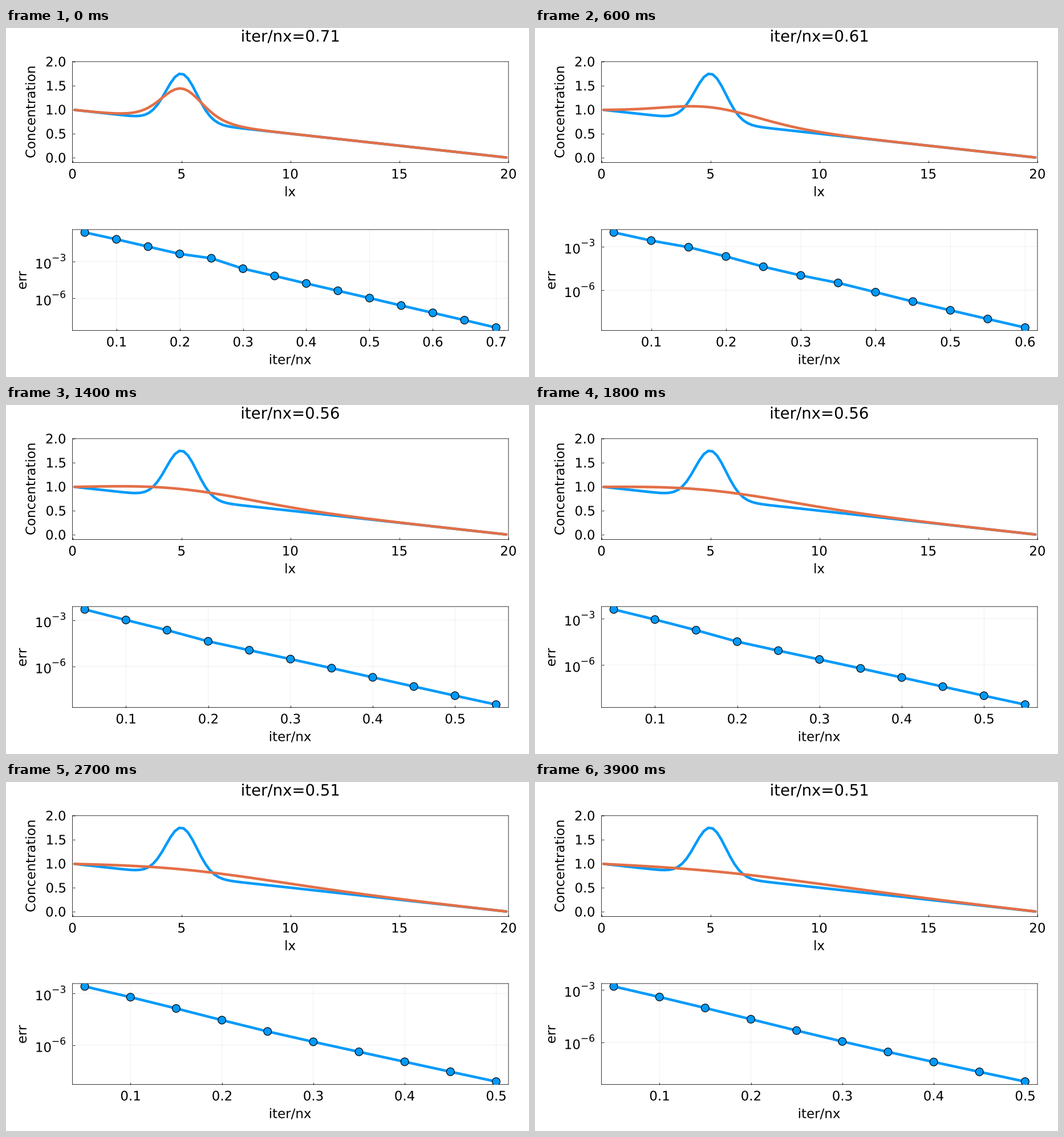
Animation of 917 by 611 pixels, one loop 4 s. Source, as a matplotlib script:

```python
import numpy as np
import matplotlib as mpl
import matplotlib.pyplot as plt
from matplotlib.animation import FuncAnimation
from matplotlib.patches import PathPatch
from matplotlib.textpath import TextPath
from matplotlib.transforms import Affine2D

mpl.rcParams["font.family"] = "DejaVu Sans"

W, H, DPI = 917, 611, 64
PX = 72 / DPI                     # points per pixel
BLUE, ORANGE = "#009AFA", "#E36F47"
LEFT, RIGHT = 116.5, 881.0
TOP1, BOT1 = 58.9, 235.5
TOP2, BOT2 = 352.9, 529.5
MID = (LEFT + RIGHT) / 2
FONT, SUP, TITLE = 22.95, 17.2, 27.55
THIN, THICK = 0.8 * PX, 4.58 * PX
MARKER = 13.75 * PX
STEPS = 40

# Physics and numerics of the implicit diffusion solver
LX, DC, DA = 20.0, 1.0, 1000.0
NX, TOL = 100, 1e-8
CHECK = 5
DX = LX / NX
RE = np.pi + np.sqrt(np.pi**2 + DA)
RHO = (LX / (DC * RE))**2
DT = LX**2 / DC / DA
DTAU = DX * np.sqrt(RHO)
xc = np.linspace(DX / 2, LX - DX / 2, NX)
c_init = 1.0 + np.exp(-(xc - LX / 4)**2) - xc / LX


def solve():
    """Return (concentration, iteration count, log10 errors) per time step."""
    c, q = c_init.copy(), np.zeros(NX - 1)
    states = []
    for _ in range(STEPS):
        old = c.copy()
        errs, it, err = [], 1, 2 * TOL
        while err >= TOL and it <= 100 * NX:
            q -= DTAU / (RHO * DC + DTAU) * (q + DC * np.diff(c) / DX)
            rate = (c - old)[1:-1] / DT + np.diff(q) / DX
            c[1:-1] -= DTAU / (1 + DTAU / DT) * rate
            if it % CHECK == 0:
                lap = np.diff(DC * np.diff(c) / DX) / DX
                err = np.abs(lap - (c - old)[1:-1] / DT).max()
                errs.append(np.log10(err))
            it += 1
        states.append((c.copy(), it, np.array(errs)))
    return states


states = solve()

fig = plt.figure(figsize=(W / DPI, H / DPI), dpi=DPI, facecolor="white")


def panel(top, bottom):
    ax = fig.add_axes([LEFT / W, 1 - bottom / H,
                       (RIGHT - LEFT) / W, (bottom - top) / H])
    ax.tick_params(direction="in", length=4 * PX, width=THIN,
                   labelbottom=False, labelleft=False)
    ax.set_axisbelow(True)
    for spine in ax.spines.values():
        spine.set(linewidth=THIN, snap=False, zorder=1.5)
    return ax


def glyphs(s, size=FONT, ha="center"):
    """Outline of a string with its inked part aligned on x = 0."""
    path = TextPath((0, 0), s, size=size)
    box = path.get_extents()
    anchor = box.x1 if ha == "right" else (box.x0 + box.x1) / 2
    return Affine2D().translate(-anchor, 0).transform_path(path)


def move(label, x, y, angle=0):
    """Set the baseline point in pixels counted from the top left."""
    place = Affine2D().rotate_deg(angle).translate(x, H - y)
    label.set_transform(place.scale(1 / W, 1 / H) + fig.transFigure)


def put(x, y, s, size=FONT, ha="center", angle=0):
    label = PathPatch(glyphs(s, size, ha), facecolor="black", lw=0)
    move(label, x, y, angle)
    return fig.add_artist(label)


def curve(ax, x, y, color):
    line, = ax.plot(x, y, color=color, lw=THICK, solid_capstyle="round",
                    solid_joinstyle="round")
    return line


# Concentration panel
ax1 = panel(TOP1, BOT1)
ax1.set_xlim(0, LX)
ax1.set_ylim(-0.1, 2.0)
ax1.set_xticks(range(0, 21, 5))
ax1.set_yticks(np.arange(0, 2.1, 0.5))
curve(ax1, xc, c_init, BLUE)
profile = curve(ax1, xc, c_init, ORANGE)

for v in range(0, 21, 5):
    put(LEFT + v / LX * (RIGHT - LEFT), 263.5, str(v))
for v in np.arange(0, 2.1, 0.5):
    y = BOT1 - (v + 0.1) / 2.1 * (BOT1 - TOP1)
    put(104, y + 8.4, f"{v:.1f}", ha="right")

title = put(MID, 23.8, "iter/nx", TITLE)
put(MID, 294.4, "lx")
put(MID, 588.4, "iter/nx")
put(51.2, (TOP1 + BOT1) / 2, "Concentration", angle=90)
put(35.8, (TOP2 + BOT2) / 2, "err", angle=90)

# Error panel
ax2 = panel(TOP2, BOT2)
ax2.grid(True, color="black", alpha=0.08, lw=THIN, snap=False)
ax2.set_yticks([-6, -3])
history = curve(ax2, [], [], BLUE)
dots = ax2.scatter([], [], color=BLUE, edgecolor="black",
                   linewidth=1.2 * PX, zorder=3)
x_labels = [put(0, 0, f"{k / 10:.1f}") for k in range(1, 8)]
y_labels = [(p, put(0, 0, "10", ha="right"),
             put(0, 0, f"\u2212{-p}", SUP, "right")) for p in (-3, -6)]


def padded(lo, hi):
    pad = 0.03 * (hi - lo)
    return lo - pad, hi + pad


def draw(i):
    c, it, errs = states[i]
    title.set_path(glyphs(f"iter/nx={it / NX:.2f}", TITLE))
    profile.set_ydata(c)

    x = CHECK / NX * np.arange(1, len(errs) + 1)
    history.set_data(x, errs)
    dots.set_offsets(np.column_stack([x, errs]))
    dots.set_sizes(np.full(len(x), MARKER**2))
    x0, x1 = padded(x[0], x[-1])
    y0, y1 = padded(errs.min(), errs.max())
    ax2.set_xticks([k / 10 for k in range(1, 8) if k / 10 <= x1])
    ax2.set_xlim(x0, x1)
    ax2.set_ylim(y0, y1)
    for grid_line in ax2.get_xgridlines():
        grid_line.set_snap(False)

    for k, label in enumerate(x_labels, 1):
        label.set_visible(k / 10 <= x1)
        move(label, LEFT + (k / 10 - x0) / (x1 - x0) * (RIGHT - LEFT), 557.5)
    for p, base, sup in y_labels:
        y = BOT2 - (p - y0) / (y1 - y0) * (BOT2 - TOP2)
        move(base, 78.5, y + 12)
        move(sup, 104, y - 0.9)
    return []


anim = FuncAnimation(fig, draw, frames=STEPS, interval=100, repeat=True,
                     repeat_delay=0, blit=False)
plt.show()
```
